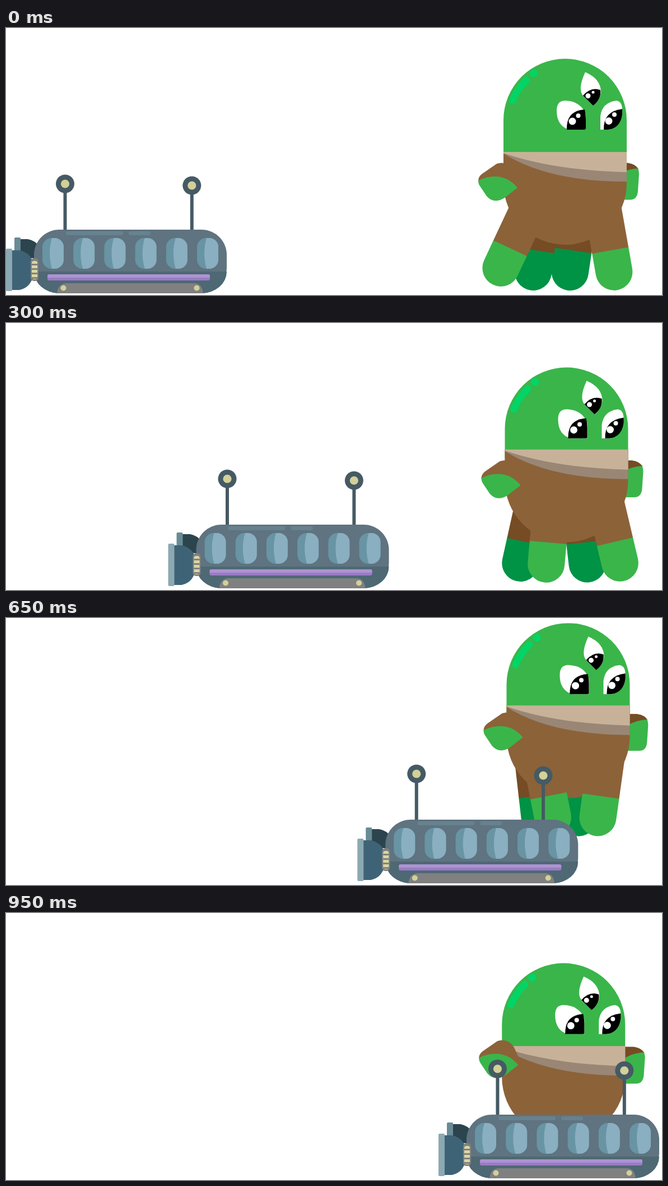
These frames come from a looping animation (1171 px wide and 478 px high, 1000 ms). An HTML page:

```html
<!DOCTYPE html>
<html lang="en">
<head>
<meta charset="utf-8">
<title>Alien hops on a bus</title>
<style>
  html, body { margin: 0; width: 100%; height: 100%; overflow: hidden; background: #fff; }
  svg { display: block; }
  .skin { fill: #3ab54a; }
  .skin-dark { fill: #009245; }
  .cloth { fill: #8c6239; }
  .cloth-dark { fill: #754c24; }
  .white { fill: #fff; }
  .lamp { fill: #d3d098; }
  .steel { fill: #455a64; }
  .grey { fill: #808080; }
</style>
</head>
<body>
<svg width="1171" height="478" viewBox="0 0 1171 478">
  <defs>
    <path id="thigh" d="M-33-42h66v93h-66z"/>
    <path id="foot" d="M-33 50h66v39a33 33 0 0 1-66 0z"/>
    <g id="window">
      <rect width="38" height="55" rx="16" fill="#6894a4"/>
      <path d="M17 0h5a16 16 0 0 1 16 16v23a16 16 0 0 1-16 16h-5Q9 27 17 0z" fill="#89afc0"/>
    </g>
    <g id="antenna">
      <path class="steel" d="M-3 0h6v85h-6z"/>
      <circle class="steel" r="16.5"/>
      <circle class="lamp" r="7.6"/>
    </g>
  </defs>

  <g id="armRight">
    <path class="cloth-dark" d="M-60 0H-20Q-6 2-1 11L-40 45H-60z"/>
    <path class="skin" d="M-60 45Q-40 12-2 10Q0 14 0 20L-2 50Q-3 66-16 66H-60z"/>
  </g>

  <g id="backLeft"><use href="#thigh" class="cloth-dark"/><use href="#foot" class="skin-dark"/></g>
  <g id="backRight"><use href="#thigh" class="cloth-dark"/><use href="#foot" class="skin-dark"/></g>

  <g id="head">
    <path class="skin" d="M0 170V110a110 110 0 0 1 220 0V170z"/>
    <path d="M16 75Q24 55 41 38" fill="none" stroke="#00d566" stroke-width="12" stroke-linecap="round"/>
    <circle cx="54" cy="26" r="7" fill="#00d566"/>
    <!-- top eye -->
    <path class="white" d="M146 24Q174 36 174 60Q173 72 160 84L142 66Q132 54 146 24z"/>
    <path d="M142 66Q156 50 173 56Q175 72 160 84z"/>
    <circle class="white" cx="151" cy="66.500" r="4.500"/>
    <circle class="white" cx="160" cy="60" r="2.500"/>
    <!-- left eye -->
    <path class="white" d="M95 93Q95 75 110 75Q139 76 147 100V127H117Q95 120 95 93z"/>
    <path d="M113 127Q112 93 145 91Q147 99 147 108V125q0 2-2 2z"/>
    <circle class="white" cx="123" cy="112" r="6.500"/>
    <circle class="white" cx="133.500" cy="102" r="4"/>
    <!-- right eye -->
    <path class="white" d="M173 127V103Q176 78 202 75Q212 77 212 91L190 127z"/>
    <path d="M179 127Q178 94 212 90V99Q209 124 187 127z"/>
    <circle class="white" cx="188" cy="111.500" r="6.500"/>
    <circle class="white" cx="198" cy="100" r="4"/>
  </g>

  <g id="torso">
    <path class="cloth" d="M0 0H220V56a110 110 0 0 1-220 0z"/>
    <path d="M0 0H220V53Q80 53 0 3z" fill="#998675"/>
    <path d="M0 0H220V36Q90 33 0 2z" fill="#c7b299"/>
  </g>

  <g id="frontLeft"><use href="#thigh" class="cloth"/><use href="#foot" class="skin"/></g>
  <g id="frontRight"><use href="#thigh" class="cloth"/><use href="#foot" class="skin"/></g>

  <g id="armLeft">
    <path class="cloth" d="M0 33Q0 25 7 20L33 2Q41-1 50 2Q58 5 63 14L72 34L70 45L30 50z"/>
    <path class="skin" d="M0 32C25 20 52 22 70 45L47 63Q28 75 15 60L3 42Q0 38 0 32z"/>
  </g>

  <g id="bus">
    <use href="#antenna" x="105.500" y="279"/>
    <use href="#antenna" x="331.800" y="282"/>
    <path d="M25 378h14Q52 380 60 392V412H25z" fill="#2c444e"/>
    <rect x="15" y="375" width="11" height="40" rx="2" fill="#688b96"/>
    <path d="M10 398H24Q50 404 50 433Q48 464 24 469H10z" fill="#3f6376"/>
    <rect y="395" width="11" height="76" rx="2" fill="#8ca9b3"/>
    <rect x="50" y="361" width="344" height="114" rx="45" fill="#5f7380"/>
    <path d="M50 436H394A45 39 0 0 1 349 475H95A45 39 0 0 1 50 436z" fill="#4e6874"/>
    <rect x="107" y="364" width="102" height="7" rx="3" fill="#66828e"/>
    <rect x="219" y="364" width="39" height="7" rx="3" fill="#66828e"/>
    <g id="windows"></g>
    <rect x="74" y="441" width="290" height="11" rx="3" fill="#9a7bc4"/>
    <path d="M74 447V444q0-3 3-3H361q3 0 3 3V447z" fill="#ac93d2"/>
    <path class="grey" d="M91 475Q93 457 108 457H336Q350 457 352 475z"/>
    <circle class="lamp" cx="102.500" cy="465.500" r="5"/>
    <circle class="lamp" cx="340.500" cy="465.500" r="5"/>
    <rect class="grey" x="44" y="412" width="14" height="41" rx="6"/>
    <rect x="46" y="417" width="10" height="33" rx="4" fill="#dad7a2"/>
    <path d="M51 422v27" stroke="#808080" stroke-width="10" stroke-dasharray="3 5"/>
  </g>
</svg>
<script>
const LOOP = 1000, STEP = 50, BEAT = 200;
const BUS_SPEED = 0.965, BUS_STOP = 800;
const $ = id => document.getElementById(id);

// One value per beat: start, stand, crouch, jump, fall, land
const body = {
  x: [888, 886, 895, 895, 889, 884],
  collar: [222, 219, 234, 144, 193.5, 253],
  crown: [55, 62, 97, 0.5, 35, 108],
  hip: [127, 121, 112, 109, 125, 106],
  shoulder: [19, 15, 23, 15.5, 2.5, -15.5]
};
// How much of each leg pose shows on each beat, and how far the legs tuck in
const strideIn = [1, 0, 0, 0, 0, 0];
const crouchIn = [0, 0, 1, 0, 0, 0];
const jumpIn = [0, 0, 0, 1, 0.7, 0.5];
const spread = [1, 1, 1, 1, 1, 0.68];

// Resting place, then [shift, angle] of each pose
const legs = {
  frontLeft: { rest: 82, stride: [-49, 25], crouch: [-1, 10], jump: [-18, -12] },
  frontRight: { rest: 178, stride: [4, -10], crouch: [14, -26.5], jump: [-3, 8.6] },
  backLeft: { rest: 51, stride: [16, 9], crouch: [-8, 25], jump: [-2, -7] },
  backRight: { rest: 141, stride: [-9, 8.5], crouch: [-8, -13], jump: [-1, 8] }
};

for (let i = 0; i < 6; i++) {
  $('windows').innerHTML += `<use href="#window" x="${65 + 55.2 * i}" y="376"/>`;
}

function place(id, x, y, angle = 0) {
  $(id).setAttribute('transform', `translate(${x} ${y}) rotate(${angle})`);
}

function draw(now) {
  const time = Math.floor(now % LOOP / STEP) * STEP;
  const beat = Math.floor(time / BEAT), part = time / BEAT - beat;
  const at = track => track[beat] + (track[beat + 1] - track[beat]) * part;

  const x = at(body.x), collar = at(body.collar), shoulder = at(body.shoulder);
  place('torso', x, collar);
  place('head', x, at(body.crown));
  place('armLeft', x - 45 + Math.min(time / 100, 4), collar + shoulder);
  place('armRight', x + 242 + Math.min(time, BUS_STOP) / 60, collar + 8 + 0.6 * shoulder);

  for (const id in legs) {
    const { rest, stride, crouch, jump } = legs[id];
    const [shift, angle] = [0, 1].map(i =>
      stride[i] * at(strideIn) + crouch[i] * at(crouchIn) + jump[i] * at(jumpIn));
    place(id, x + 110 + (rest + shift - 110) * at(spread), collar + at(body.hip), angle);
  }
  place('bus', Math.min(time, BUS_STOP) * BUS_SPEED, 0);
}

const start = performance.now();
function tick() {
  draw(performance.now() - start);
  requestAnimationFrame(tick);
}
tick();
</script>
</body>
</html>
```
